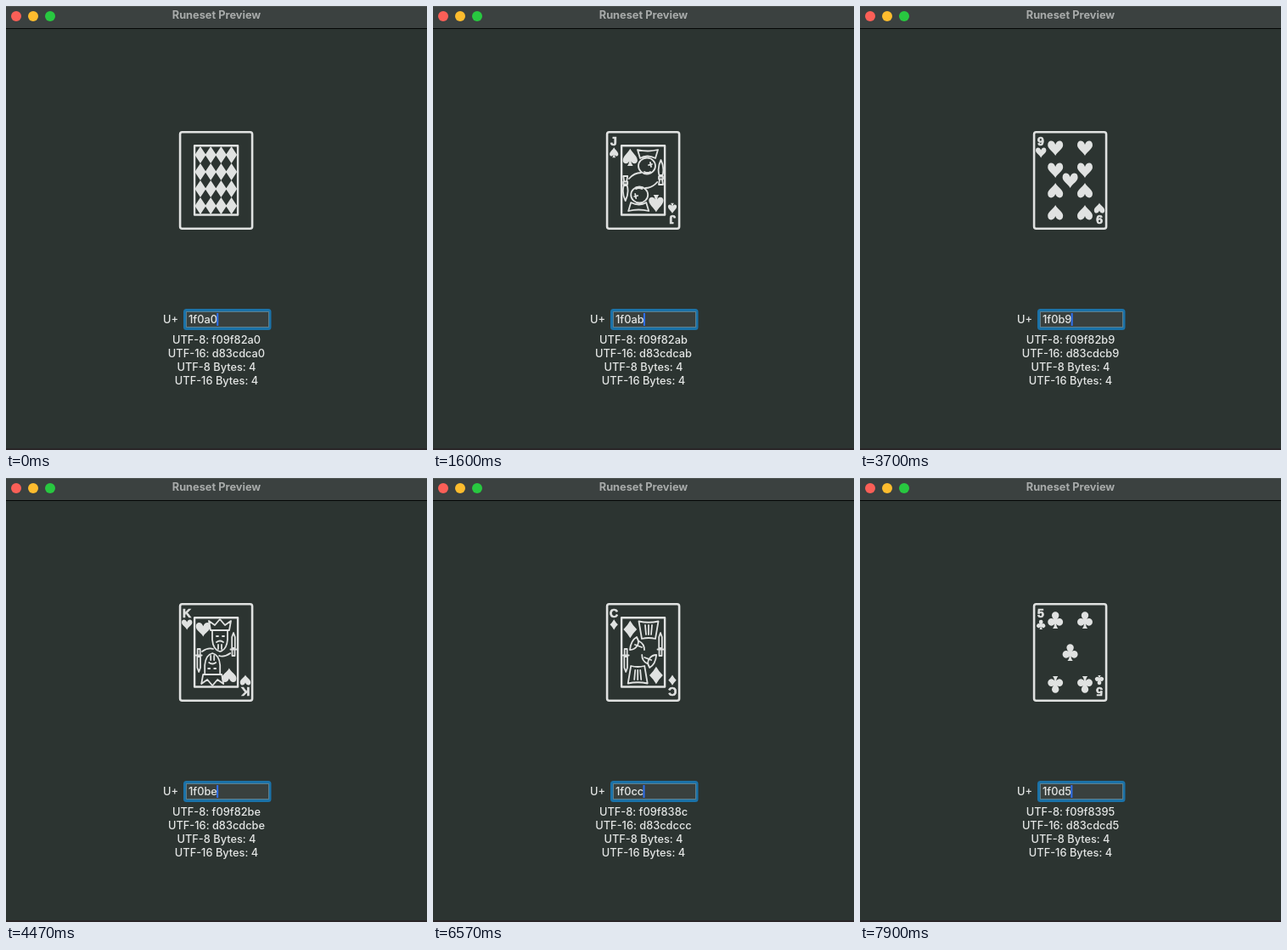
Write an HTML page that moves like this. It is 496 px wide and 522 px high and loops after 8 s.

```html
<!DOCTYPE html>
<html lang="en">
<head>
<meta charset="utf-8">
<title>Runeset Preview</title>
<style>
  html, body { margin: 0; width: 100%; height: 100%; overflow: hidden; background: #2c3431; }
  svg { display: block; width: 100%; height: 100%; }
  text { font: 500 12.8px Inter, Roboto, sans-serif; fill: #e4e6e5; }
  .mid { text-anchor: middle; }
  .title { font-weight: 700; font-size: 12.8px; fill: #a8abaa; }
  .rank { font: bold 14px "Liberation Sans", sans-serif; fill: #e0e2e1; stroke: #e0e2e1; stroke-width: .7; text-anchor: middle; }
  .rank.wide { font-size: 12px; letter-spacing: -.8px; }
  #card { fill: #e0e2e1; }
  .line { fill: none; stroke: #e0e2e1; stroke-width: 1.8; stroke-linejoin: round; stroke-linecap: round; }
</style>
</head>
<body>
<svg viewBox="0 0 496 522" xmlns="http://www.w3.org/2000/svg">
  <rect width="496" height="522" fill="#2c3431"/>
  <rect width="496" height="26" fill="#3b4140"/>
  <rect width="496" height="1" fill="#505654"/>
  <rect y="26" width="496" height="1" fill="#050706"/>
  <rect y="520" width="496" height="2" fill="#292527"/>
  <circle cx="12" cy="12" r="6" fill="#fb5f57"/>
  <circle cx="32" cy="12" r="6" fill="#fdbc2e"/>
  <circle cx="52" cy="12" r="6" fill="#28c840"/>
  <text class="mid title" x="248" y="15">Runeset Preview</text>

  <g id="card"></g>

  <text x="185" y="373">U+</text>
  <rect x="209" y="356" width="103.5" height="25" rx="3.5" fill="#1b72a8"/>
  <rect x="212.5" y="359.5" width="97" height="18" fill="#39403e" stroke="#5f7f8c"/>
  <text id="code" x="215" y="373"></text>
  <rect id="caret" y="361" width="2" height="15" fill="#2f70ee"/>
  <text class="mid" id="utf8" x="248" y="397"></text>
  <text class="mid" id="utf16" x="248" y="413"></text>
  <text class="mid" id="size8" x="248" y="429"></text>
  <text class="mid" id="size16" x="248" y="445"></text>
</svg>
<script>
const LOOP = 8000, STEP = 150, LAST = 53, FIRST_CODE = 0x1f0a0;
const MID_X = 247.6, MID_Y = 205;
const el = id => document.getElementById(id);

// Suit shapes in units of half a pip's width.
const SUITS = [
  'M0-1.2C.3-.6 1-.2 1 .4C1 .95.3 1 .12.5Q.15.9.38 1.15H-.38Q-.15.9-.12.5C-.3 1-1 .95-1 .4C-1-.2-.3-.6 0-1.2Z',
  'M0 1C-.25.45-1 .15-1-.4C-1-1.12-.2-1.1 0-.45C.2-1.1 1-1.12 1-.4C1 .15.25.45 0 1Z',
  'M0-1.2Q.4-.5.92 0Q.4.5 0 1.2Q-.4.5-.92 0Q-.4-.5 0-1.2Z',
  'M-.47-.6a.47.47 0 0 1 .94 0Q.47-.35.22-.12A.48.48 0 1 1 .1.5Q.15.9.35 1.1H-.35Q-.15.9-.1.5A.48.48 0 1 1-.22-.12Q-.47-.35-.47-.6Z'
];

// Pip offsets: side pairs by height, then the middle column.
const PIPS = {
  2: [[], [-38, 38]], 3: [[], [-38, 0, 38]],
  4: [[-38, 38], []], 5: [[-38, 38], [0]], 6: [[-38, 0, 38], []],
  7: [[-38, 0, 38], [-19]], 8: [[-38, 0, 38], [-19, 19]],
  9: [[-38, -12, 12, 38], [0]], 10: [[-38, -12, 12, 38], [-25, 25]]
};

const SPEAR = 'M268.5 181Q273 190 270.5 199H266.5Q264 190 268.5 181ZM266 200.5h5v3h-5ZM267 204L266 210H271L270 204';
const SWORD = 'M268 182L266.2 187V200H269.8V187ZM264.5 201.5H271.5M266.5 202V209H269.5V202';
const CROWN = 'M241 179L239 168L246 173L252 166L258 173L265 168L263 179Z';
const HEAD = 'M242 188a10 9.5 0 1 0 20 0a10 9.5 0 1 0-20 0';

const FACES = {
  11: 'M241 169Q253 172 265 169L262 179Q252 174 244 179Z' + HEAD +
      'M254 187l4-1M256 184l1 5M249 195q4 2 7 0M231 203Q237 196 245 196' + SPEAR,
  12: 'M242.5 168.5Q254 171 265.5 168.5L262 189Q254 187 246 189ZM250 173L251 184M254 173V184M258 173L257 184' +
      'M232 202Q233 191 240 187Q244 193 240 198Q237 202 232 202ZM240 187L242 192M238 196L246 199M243 192Q249 195 249 202' + SWORD,
  13: CROWN + HEAD + 'M243 185Q239 196 241 202M261 185Q265 196 263 202M249 187h2M255 187h2M250 193q3 2 5 0M231 203Q237 197 243 199' +
      'M269 190a3 3 0 1 0 .1 0M269 196V210M269 203l-3-3M269 205l3-3',
  14: CROWN + 'M243 180V190Q244 202 252 204Q260 202 261 190V180M248 186h2M255 186h2M248 193Q252 190 256 193M250 196V201M254 196V201M231 204Q238 199 244 201' + SWORD
};

const JOKER = 'M237 191Q226 177 230 174Q241 171 247.6 184Q254 171 265 174Q269 177 258 191ZM247.6 184V170' +
  'M238 192Q238 209 247.6 210Q257 209 257 192M244 197h1M251 197h1M243 202Q247.6 206 252 202' +
  'M238 211L228 238L240 232L247.6 240L255 232L267 238L257 211';

const line = d => `<path class="line" d="${d}"/>`;
const box = (x, y, w, h, r, width) =>
  `<rect class="line" x="${x}" y="${y}" width="${w}" height="${h}" rx="${r}" style="stroke-width:${width}"/>`;
const pip = (suit, x, y, size, flip = false) =>
  `<path d="${SUITS[suit]}" transform="translate(${x} ${y}) scale(${flip ? -size : size})"/>`;
const twice = art => `<g>${art}</g><g transform="rotate(180 ${MID_X} ${MID_Y})">${art}</g>`;

const outer = box(205.1, 148.2, 85, 113.5, 2.5, 2.6);
const inner = box(222.1, 164.2, 51, 81.3, 0, 2.4);

function backArt() {
  let d = '';
  for (let row = 0; row < 4; row++)
    for (let col = 0; col < 4; col++)
      d += `M${229 + col * 12.2} ${165 + row * 20}l6.6 10l-6.6 10l-6.6-10z`;
  return inner + `<path d="${d}"/>`;
}

function pipArt(rank, suit) {
  if (rank === 1) return pip(suit, MID_X, MID_Y, 12.6);
  const [sides, middle] = PIPS[rank];
  const put = (x, dy) => pip(suit, x, MID_Y + dy, 9, dy > 0);
  return sides.map(dy => put(230.2, dy) + put(265, dy)).join('') +
    middle.map(dy => put(MID_X, dy)).join('');
}

function cardArt(index) {
  const rank = index % 16, suit = index >> 4;
  if (index === 0) return outer + backArt();
  if (rank === 15) return outer + inner + line(JOKER) +
    [[230, 174], [247.6, 169], [265, 174]].map(([x, y]) => `<circle cx="${x}" cy="${y}" r="2.3"/>`).join('');
  const label = { 1: 'A', 11: 'J', 12: 'C', 13: 'Q', 14: 'K' }[rank] || rank;
  const corner = `<text class="rank${rank === 10 ? ' wide' : ''}" x="213" y="163.6">${label}</text>` +
    pip(suit, 213.2, 172.3, suit === 1 ? 6.2 : 5.1);
  const body = rank > 10
    ? inner + twice(pip(suit, 232.3, 178, 8.6) + line(FACES[rank]))
    : pipArt(rank, suit);
  return outer + twice(corner) + body;
}

// Unassigned code points leave the previous card standing.
const UNASSIGNED = [15, 16, 32, 48];
function shownCard(index) {
  while (UNASSIGNED.includes(index)) index--;
  return index;
}

// The typing rhythm is a steady beat with slight jitter.
const LATE = [41, 47];
const startOf = index => STEP * index - (LATE.includes(index) ? 20 : index % 2 ? 50 : 30);

const hex = (units, width) => [...units].map(u => u.toString(16).padStart(width, '0')).join('');

let current = -1;
function show(index) {
  if (index === current) return;
  current = index;
  const point = FIRST_CODE + index;
  const char = String.fromCodePoint(point);
  const bytes = new TextEncoder().encode(char);
  const units = char.split('').map(c => c.charCodeAt(0));
  el('card').innerHTML = cardArt(shownCard(index));
  el('code').textContent = point.toString(16);
  el('caret').setAttribute('x', 215 + el('code').getComputedTextLength() - .7);
  el('utf8').textContent = `UTF-8: ${hex(bytes, 2)}`;
  el('utf16').textContent = `UTF-16: ${hex(units, 4)}`;
  el('size8').textContent = `UTF-8 Bytes: ${bytes.length}`;
  el('size16').textContent = `UTF-16 Bytes: ${units.length * 2}`;
}

let start;
function frame(now) {
  start ??= now;
  const time = (now - start) % LOOP;
  let index = LAST;
  while (index > 0 && startOf(index) > time) index--;
  show(index);
  requestAnimationFrame(frame);
}
show(0);
requestAnimationFrame(frame);
</script>
</body>
</html>
```
